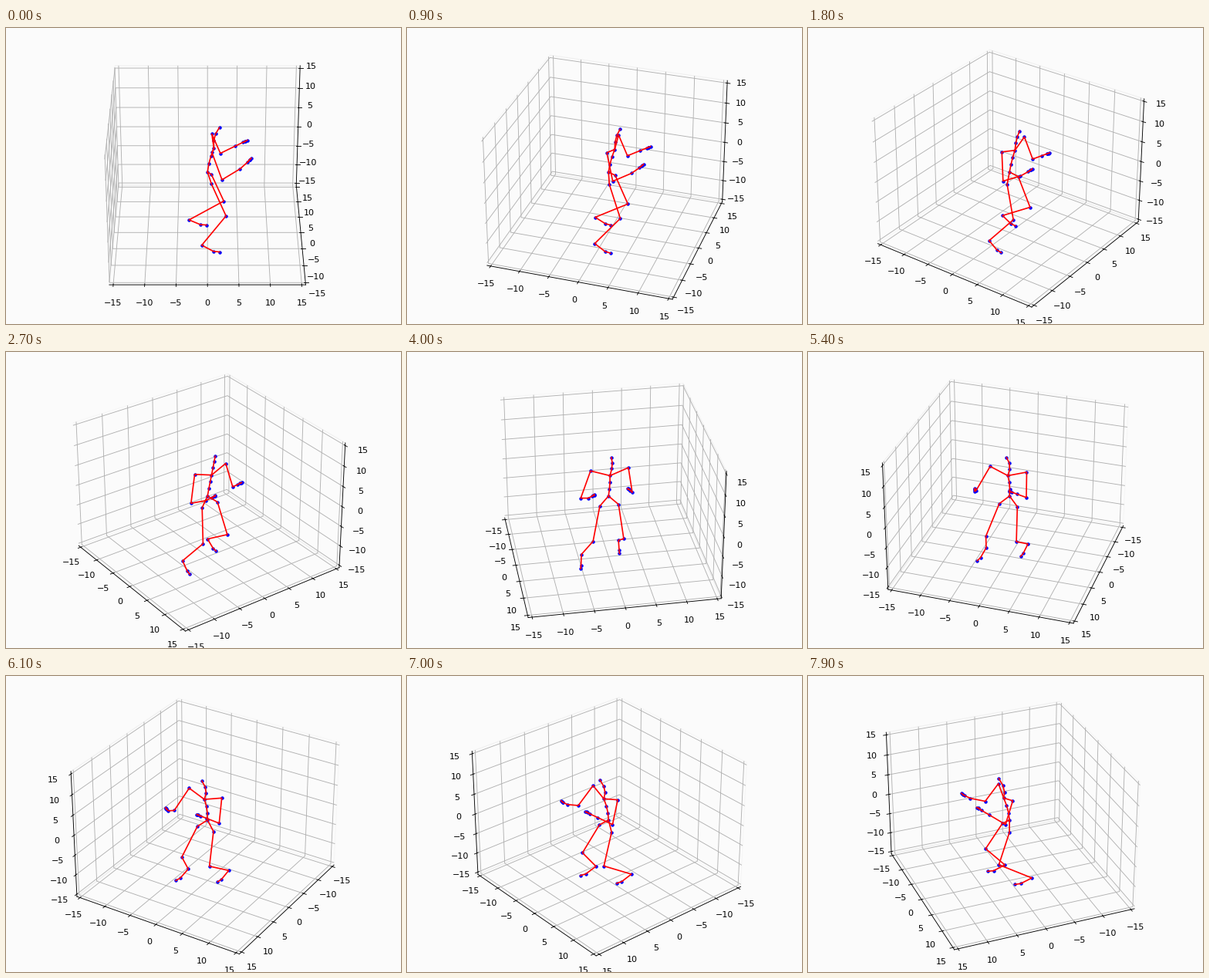
A matplotlib script for the animation above (8 s loop, 512 by 384 pixels).

```python
import numpy as np
import matplotlib.pyplot as plt
from matplotlib.animation import FuncAnimation

FRAMES, INTERVAL = 80, 100
STEP = 2          # camera degrees per frame
START = -89.999   # just past the side view, so the visible walls are unambiguous
LIM = 15 * 25 / 24
PAPER = "#fbfbfb"
HAND = np.cumsum([0, 3.62, 1.8, .6, .45])  # elbow to fingertip


def bow(a, b, bend=(0, 0, 0), t=np.linspace(0, 1, 4)):
    """Joints from a to b along a parabola pushed aside by bend."""
    a, b, bend, t = np.array(a), np.array(b), np.array(bend), np.array(t)[:, None]
    return a + (b - a) * t + 2 * t * (1 - t) * bend


# Points are (forward, left, up), measured from the pelvis.
root, thorax, head = (0, 0, 0), (1.04, .06, 5.85), (1.91, .13, 10.95)


def leg(side, knee, ankle, ball):
    hip = (.65, 1.56 * side, -1.84)
    # Toes lie flat and point the way the foot does.
    toe = np.array(ball) + .54 * np.subtract(ball, ankle) * (1, 1, 0)
    return [np.array([root, hip, knee, ankle, ball, toe])]


def arm(side, elbow, tip, bend=(0, 0, 0)):
    shoulder = (.71, .04 + 3.11 * side, 7.2)
    forearm = bow(elbow, tip, bend, HAND / HAND[-1])
    wrist = forearm[2]
    thumb = wrist + (.36, -.33 * side, .45)
    return [np.vstack([thorax, shoulder, forearm]), np.array([wrist, thumb])]


chains = [
    bow(root, thorax, (-.29, .22, 0)),
    bow(thorax, head, (-.71, .62, -.1)),
    *leg(1, knee=(2.72, 2.07, -9.08), ankle=(-3.1, 2.26, -14.17), ball=(-1.2, 2.03, -15.23)),
    *leg(-1, knee=(3.04, -3.11, -8.73), ankle=(-.95, -4.44, -15.2), ball=(.95, -4.83, -16.45)),
    *arm(1, elbow=(2.13, 3.55, 2.03), tip=(6.5, 2.05, 6.43)),
    *arm(-1, elbow=(2.33, -4.97, 1.9), tip=(7.02, -3.55, 6.18), bend=(.55, -.05, -.6)),
]

fig = plt.figure(figsize=(6.4, 4.8), dpi=80, facecolor=PAPER)
ax = fig.add_axes([0, 0, 1, 1], projection="3d", facecolor=PAPER)
ax.set(xlim=(-LIM, LIM), ylim=(-LIM, LIM), zlim=(-LIM, LIM))
for axis in (ax.xaxis, ax.yaxis, ax.zaxis):
    axis.set_ticks(range(-15, 16, 5))
    axis.pane.fill = False

ax.plot(*np.unique(np.vstack(chains), axis=0).T, "b.")
for chain in chains:
    ax.plot(*chain.T, "r")


def update(i):
    ax.view_init(elev=30, azim=START + STEP * i)
    return []


anim = FuncAnimation(fig, update, frames=FRAMES, interval=INTERVAL,
                     init_func=lambda: update(0), repeat=True, repeat_delay=0)
plt.show()
```
